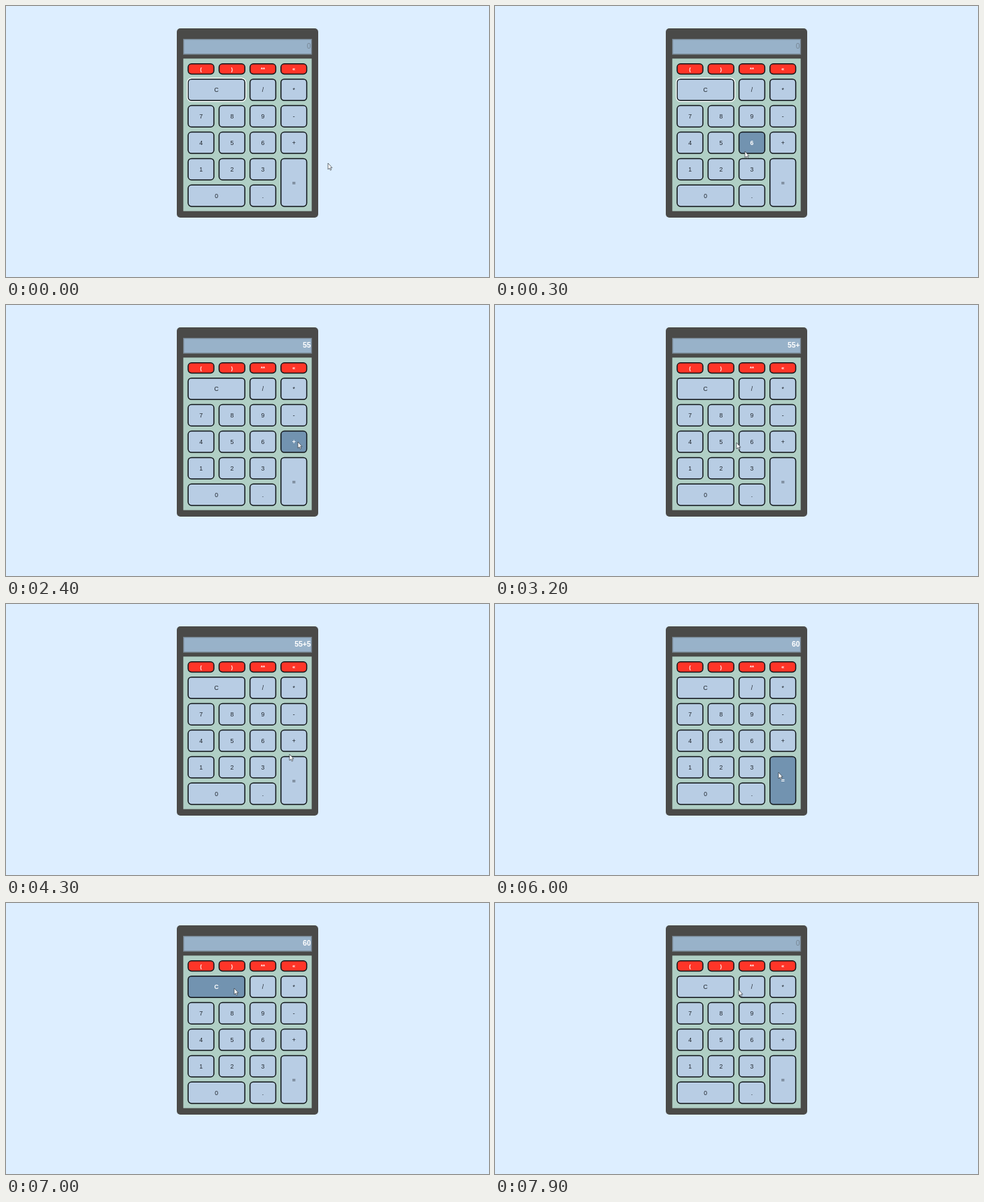
Write an HTML page that moves like this. It is 690 px wide and 388 px high and loops after 8000 ms.

```html
<!DOCTYPE html>
<html lang="en">
<head>
<meta charset="utf-8">
<title>Calculator</title>
<style>
  html, body { margin: 0; width: 100%; height: 100%; overflow: hidden; background: #def; }
  svg { display: block; width: 690px; height: 388px; }
  text { font-family: "Liberation Sans", Arial, sans-serif; text-anchor: middle; }
  .key rect { fill: #b8cde4; stroke: #10151a; stroke-width: 1.5; }
  .key text { fill: #20262d; font-size: 8.7px; }
  .red rect { fill: #ff3528; }
  .red text { fill: #fff; font-size: 7.6px; font-weight: bold; }
  .hover rect { fill: #7293b0; }
  .hover text { fill: #fff; font-weight: bold; }
  #value { text-anchor: end; font-size: 10.4px; font-weight: bold; fill: #fff; }
  #value.empty { font-weight: normal; fill: #788896; }
</style>
</head>
<body>
<svg viewBox="0 0 690 388">
  <rect x="244" y="32" width="202" height="271" rx="5" fill="#4a4a48"/>
  <rect x="253.7" y="47.7" width="182.8" height="21.3" fill="#98b2c9" stroke="#768490" stroke-width="1.3"/>
  <rect x="253.3" y="75.3" width="183.4" height="218.4" fill="#b0cfc5"/>
  <text id="value" x="435.6" y="61.4"></text>
  <g id="keys"></g>
  <rect id="ring" x="259" y="103.4" width="83.6" height="33.2" rx="5.8" fill="none" stroke="#fff" stroke-width="1.2"/>
  <path id="cursor" d="M0 0V9L2 7.2L3.4 10.2L4.8 9.5L3.4 6.7H6Z" fill="#fff" stroke="#333a42" stroke-width=".7" stroke-linejoin="round"/>
</svg>
<script>
const NS = "http://www.w3.org/2000/svg";
const $ = id => document.getElementById(id);
const keys = {};

function add(parent, tag, attrs) {
  const el = document.createElementNS(NS, tag);
  for (const name in attrs) el.setAttribute(name, attrs[name]);
  return parent.appendChild(el);
}

// Grid cell: column, row, column span, row span
function addKey(label, col, row, cols = 1, rows = 1) {
  const red = row === 0;
  const x = 260.2 + col * 44.2, w = 36.8 + (cols - 1) * 44.2;
  const y = red ? 82.8 : 66.8 + row * 37.9;
  const h = red ? 14.6 : 30.6 + (rows - 1) * 37.9;
  const g = add($("keys"), "g", { class: red ? "key red" : "key" });
  add(g, "rect", { x, y, width: w, height: h, rx: 4.8 });
  add(g, "text", { x: x + w / 2, y: y + h / 2 + (red ? 2.4 : 3) }).textContent = label;
  keys[label] = g;
}

["(", ")", "**", "«"].forEach((s, i) => addKey(s, i, 0));
addKey("C", 0, 1, 2);
addKey("/", 2, 1);
addKey("*", 3, 1);
["789-", "456+", "123"].forEach((line, r) =>
  [...line].forEach((s, i) => addKey(s, i, r + 2)));
addKey("=", 3, 5 - 1, 1, 2);
addKey("0", 0, 5, 2);
addKey(".", 2, 5);

// Time, pointer x, y, hovered key, display
const steps = [
  [0, 460, 225, "", ""],
  [100, 409, 222, "=", ""],
  [200, 378, 212, "", ""],
  [300, 357, 208, "6", ""],
  [1100, 333, 195, "5", ""],
  [1500, 333, 195, "5", "5"],
  [2200, 333, 195, "5", "55"],
  [2300, 372, 196, "6", "55"],
  [2400, 417, 196, "+", "55"],
  [2600, 417, 196, "+", "55+"],
  [2900, 406, 196, "+", "55+"],
  [3000, 388, 196, "", "55+"],
  [3100, 368, 197, "6", "55+"],
  [3200, 345, 197, "", "55+"],
  [3300, 333, 196, "5", "55+"],
  [3900, 333, 196, "5", "55+5"],
  [4000, 387, 200, "", "55+5"],
  [4300, 405, 215, "", "55+5"],
  [4900, 405, 239, "=", "55+5"],
  [5400, 405, 241, "=", "60"],
  [6100, 400, 232, "=", "60"],
  [6200, 388, 208, "", "60"],
  [6300, 372, 182, "6", "60"],
  [6400, 354, 148, "9", "60"],
  [6500, 340, 122, "", "60"],
  [6900, 333, 122, "C", "60"],
  [7000, 326, 122, "C", "60"],
  [7500, 326, 122, "C", ""],
  [7900, 348, 124, "", ""]
];
const LOOP = 8000;
const start = performance.now();

function draw(now) {
  const t = Math.max(0, now - start) % LOOP;
  const [, x, y, hover, shown] = steps.findLast(s => s[0] <= t);
  $("cursor").setAttribute("transform", `translate(${x} ${y})`);
  for (const label in keys) keys[label].classList.toggle("hover", label === hover);
  $("value").textContent = shown || "0";
  $("value").classList.toggle("empty", !shown);
  $("ring").style.display = t < 1100 ? "" : "none";
  requestAnimationFrame(draw);
}
draw(start);
</script>
</body>
</html>
```
